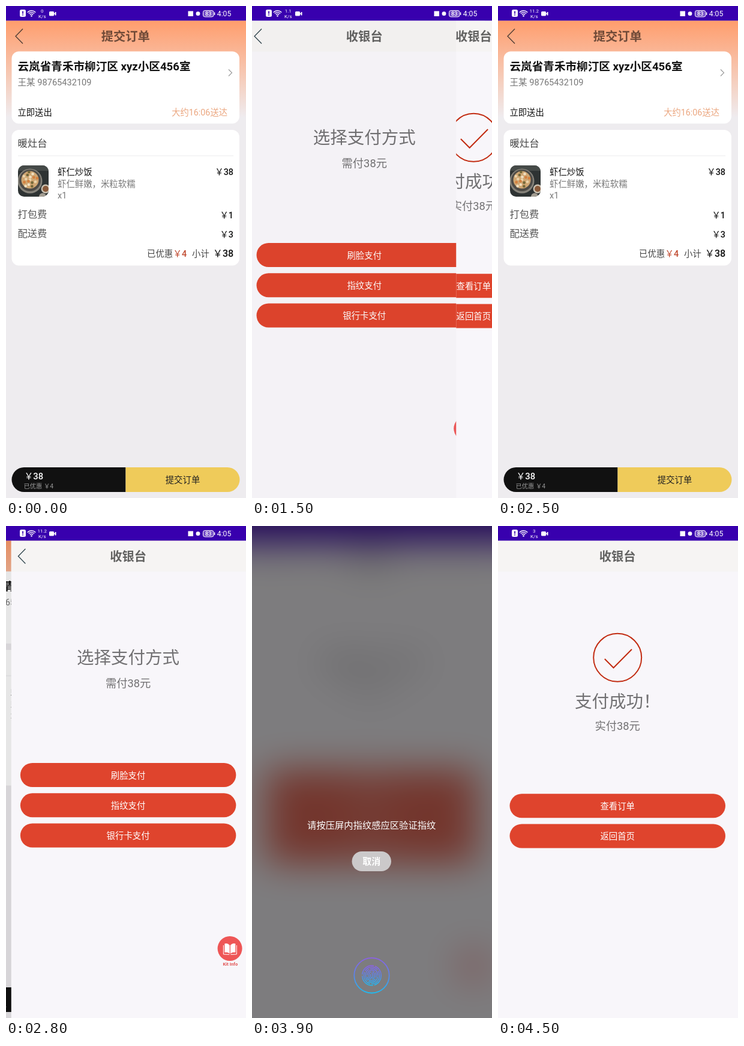
These frames come from a looping animation (400x818 px, 4.6 s). An HTML page with a canvas:

```html
<!DOCTYPE html>
<html lang="zh-CN">
<head>
<meta charset="utf-8">
<title>提交订单</title>
<style>
html, body { margin: 0; width: 100%; height: 100%; overflow: hidden; background: #f8f6fa; }
canvas { display: block; width: 400px; height: 818px; }
</style>
</head>
<body>
<canvas id="stage"></canvas>
<script>
const W = 400, H = 818, BAR = 24.3, LOOP = 4600;
const FONT = 'Roboto, "Noto Sans CJK SC", "Noto Sans CJK", sans-serif';
const RED = '#df442d', PURPLE = '#3800ae', PAGE = '#f8f6fa', GREY = 'rgba(0,0,0,.54)';
const YEN = '\uFFE5';

function makeCanvas(w, h, scale) {
  const cv = document.createElement('canvas');
  cv.width = w * scale;
  cv.height = h * scale;
  return cv;
}

const dpr = window.devicePixelRatio || 1;
const stage = document.getElementById('stage');
stage.width = W * dpr;
stage.height = H * dpr;
const screen2d = stage.getContext('2d');
screen2d.scale(dpr, dpr);
let c = screen2d;

// --- drawing helpers ---
function text(s, x, cy, size, color, align = 'left', weight = 400) {
  c.font = `${weight} ${size}px ${FONT}`;
  c.fillStyle = color;
  c.textAlign = align;
  c.textBaseline = 'alphabetic';
  c.fillText(s, x, cy + size * 0.36);
}

function rect(x, y, w, h, color) {
  c.fillStyle = color;
  c.fillRect(x, y, w, h);
}

function round(x, y, w, h, r, color) {
  c.beginPath();
  c.roundRect(x, y, w, h, r);
  c.fillStyle = color;
  c.fill();
}

function disc(x, y, r, color) {
  c.beginPath();
  c.arc(x, y, r, 0, Math.PI * 2);
  c.fillStyle = color;
  c.fill();
}

function ring(x, y, r, color, width) {
  c.beginPath();
  c.arc(x, y, r, 0, Math.PI * 2);
  c.strokeStyle = color;
  c.lineWidth = width;
  c.stroke();
}

function line(points, color, width) {
  c.beginPath();
  points.forEach(([x, y]) => c.lineTo(x, y));
  c.strokeStyle = color;
  c.lineWidth = width;
  c.stroke();
}

function button(label, y) {
  round(19.5, y, 359.5, 40, 20, RED);
  text(label, 199.2, y + 20.7, 14.4, '#fff', 'center', 500);
}

const back = color => line([[28, 38], [16, 50.2], [28, 62.5]], color, 1.3);

// --- pages ---
function dish() {
  c.save();
  c.beginPath();
  c.roundRect(20, 265, 51, 52, 10);
  c.clip();
  rect(20, 265, 51, 52, '#2e3333');
  rect(20, 265, 51, 9, '#454a48');
  disc(40, 291, 20.5, '#85827a');
  disc(40, 290, 18, '#4d4b47');
  disc(40, 289, 14.5, '#cfa672');
  for (let i = 0; i < 16; i++) {
    const a = i * 2.4, d = 3.4 * Math.sqrt(i);
    disc(40 + d * Math.cos(a), 289 + d * Math.sin(a), 2.3,
      ['#ead3aa', '#d4803f', '#f0dfc0', '#74683a'][i % 4]);
  }
  disc(66, 304, 7.5, '#c9c0b0');
  disc(66, 304, 5, '#8a5a3a');
  disc(61, 317, 6, '#a39d92');
  c.restore();
}

function orderPage() {
  rect(0, BAR, W, H, '#eeecef');
  const g = c.createLinearGradient(0, BAR, 0, 185);
  g.addColorStop(0, '#ff9d6c');
  g.addColorStop(1, '#efecef');
  rect(0, BAR, W, 160, g);
  back('#4a3a33');
  text('提交订单', 199.2, 51, 20.3, 'rgba(0,0,0,.56)', 'center', 700);

  round(9.5, 75.5, 379.5, 120, 12, '#fff');
  text('云岚省青禾市柳汀区 xyz小区456室', 19.5, 100, 18.6, '#111', 'left', 700);
  text('王某 98765432109', 19.5, 127, 14.6, '#777');
  line([[371, 105.5], [376.5, 111], [371, 116.5]], '#999', 1.1);
  text('立即送出', 19.5, 177, 14.3, '#111', 'left', 500);
  text('大约16:06送达', 369, 177, 14.3, '#eba67f', 'right');

  round(9.5, 206, 379.5, 225.5, 12, '#fff');
  text('暖灶台', 19.5, 228, 16.4, '#444');
  rect(20, 248.5, 359, 1, '#ececee');
  dish();
  text('虾仁炒饭', 86, 276, 14.4, '#111', 'left', 500);
  text('虾仁鲜嫩，米粒软糯', 86, 296, 14.4, '#777');
  text('x1', 86, 315, 14.4, '#777');
  text('打包费', 19.5, 346.5, 16.3, '#555');
  text('配送费', 19.5, 378.5, 16.3, '#555');
  [[38, 276], [1, 347.5], [3, 380]].forEach(([n, y]) =>
    text(YEN + n, 379, y, 14.4, '#111', 'right', 500));
  text('已优惠', 235, 411.5, 14.4, '#444');
  text(YEN + 4, 278.5, 411.5, 14.4, '#c0492f', 'left', 500);
  text('小计', 310, 411.5, 14.4, '#444');
  text(YEN + 38, 379.3, 411, 16.2, '#111', 'right', 500);

  round(9.5, 767, 190, 41, [20.5, 0, 0, 20.5], '#111');
  round(199.5, 767, 190, 41, [0, 20.5, 20.5, 0], '#efcb5a');
  text(YEN + 38, 30.5, 781.5, 14.8, '#fff', 'left', 500);
  text('已优惠 ' + YEN + 4, 29.5, 798, 10.3, '#999');
  text('提交订单', 294.5, 788, 14.4, '#222', 'center', 500);
}

function cashHeader() {
  rect(0, BAR, W, H, PAGE);
  rect(0, BAR, W, 51.5, '#f6f4f3');
  text('收银台', 199.2, 51, 20.3, 'rgba(0,0,0,.6)', 'center', 700);
}

function kitInfo() {
  disc(368.7, 702.5, 20.5, '#ee5656');
  c.fillStyle = '#fff';
  for (const side of [-1, 1]) {
    c.beginPath();
    c.moveTo(369 + side * 0.6, 697);
    c.quadraticCurveTo(369 + side * 4, 693, 369 + side * 9, 694.5);
    c.lineTo(369 + side * 9, 709);
    c.quadraticCurveTo(369 + side * 4, 708, 369 + side * 0.6, 711);
    c.fill();
    line([[369 + side * 11, 697], [369 + side * 11, 712], [369 + side, 712.5]], '#fff', 1);
  }
  text('Kit Info', 369.5, 728, 7.6, '#e25555', 'center', 700);
}

function cashierPage() {
  cashHeader();
  back('#2f444c');
  text('选择支付方式', 199.2, 219, 28.5, GREY, 'center');
  text('需付38元', 199.2, 261, 18.3, GREY, 'center');
  button('刷脸支付', 394);
  button('指纹支付', 444.3);
  button('银行卡支付', 494.5);
  kitInfo();
}

function successPage() {
  cashHeader();
  ring(199.2, 218.8, 40, '#c22c12', 2);
  line([[177.8, 221], [192.5, 235.8], [223, 205]], '#c22c12', 2);
  text('支付成功！', 199.2, 291.5, 28.5, GREY, 'center');
  text('实付38元', 199.2, 332.5, 18.3, GREY, 'center');
  button('查看订单', 445.3);
  button('返回首页', 495.5);
}

function statusBar(speed) {
  rect(0, 0, W, BAR, PURPLE);
  round(23, 6, 10, 12, 2.5, '#fff');
  rect(27.2, 8.5, 1.7, 4.5, PURPLE);
  rect(27.2, 14, 1.7, 1.7, PURPLE);
  for (const r of [3.6, 6.4, 9.2]) {
    c.beginPath();
    c.arc(42.5, 17, r, -Math.PI * 0.76, -Math.PI * 0.24);
    c.strokeStyle = '#fff';
    c.lineWidth = 1.4;
    c.stroke();
  }
  disc(42.5, 16.5, 1.3, '#fff');
  text(speed, 60.3, 8, 8, '#fff', 'center');
  text('K/s', 60.3, 17, 8, '#fff', 'center');
  round(72, 9, 8, 7.5, 1.5, '#fff');
  line([[82.5, 10], [82.5, 15.5]], '#fff', 2);
  rect(79, 12, 3, 1.5, '#fff');

  round(303.5, 8.5, 8.5, 8.5, 0, '#fff');
  disc(320, 12.7, 3.4, '#fff');
  c.beginPath();
  c.roundRect(328.5, 7.5, 17.5, 10.5, 3);
  c.fillStyle = 'rgba(255,255,255,.3)';
  c.fill();
  c.strokeStyle = '#fff';
  c.lineWidth = 1;
  c.stroke();
  rect(347, 10.5, 1.3, 4.5, '#fff');
  text('83', 337.2, 12.8, 9.3, '#fff', 'center', 500);
  text('4:05', 375.3, 13, 12.2, '#fff', 'right');
}

// --- fingerprint prompt ---
function buildBlur() {
  const pad = 120, src = makeCanvas(W + pad * 2, H + pad * 2, 1);
  const out = makeCanvas(W, H, 1), keep = c;
  c = src.getContext('2d');
  rect(0, 0, src.width, src.height, PAGE);
  c.translate(pad, pad);
  c.scale(1, 1.04);
  cashierPage();
  rect(-pad, BAR, pad, H, PAGE);
  rect(-pad, -pad, src.width, pad + BAR, PURPLE);
  c = out.getContext('2d');
  c.filter = 'blur(32px)';
  c.drawImage(src, -pad, -pad);
  c.filter = 'none';
  rect(0, 0, W, H, 'rgba(4,4,4,.5)');
  c = keep;
  return out;
}
const blurred = buildBlur();

function glow(y, r) {
  const g = c.createLinearGradient(0, y - r, 0, y + r);
  g.addColorStop(0, '#8d5fe6');
  g.addColorStop(0.5, '#5a86ea');
  g.addColorStop(1, '#1cbdf2');
  return g;
}

function fingerprint(x, y) {
  ring(x, y, 29.2, glow(y, 30), 1.8);
  c.lineCap = 'round';
  c.strokeStyle = glow(y, 17);
  c.lineWidth = 1.5;
  for (let i = 0; i < 6; i++) {
    c.beginPath();
    c.ellipse(x, y, 1.8 + i * 2.8, 4 + i * 2.5, 0, 0, Math.PI * 2);
    c.setLineDash([11 + i * 3, 3.2]);
    c.lineDashOffset = i * 7;
    c.stroke();
  }
  c.setLineDash([]);
  c.lineCap = 'butt';
}

function prompt(alpha) {
  c.save();
  c.globalAlpha = alpha;
  c.drawImage(blurred, 0, 0, W, H);
  text('请按压屏内指纹感应区验证指纹', 199.2, 497, 15.3, '#fff', 'center', 500);
  round(166.5, 541, 65.5, 33, 16.5, '#cbc9ca');
  text('取消', 199.2, 558, 15, '#fff', 'center', 700);
  fingerprint(199.5, 747.3);
  c.restore();
}

function touchRing(alpha) {
  c.save();
  c.globalAlpha = alpha;
  disc(209.7, 754.3, 11.3, '#fcfbfe');
  ring(209.7, 754.3, 11.3, '#b7c6da', 1.7);
  c.restore();
}

// --- timeline ---
const clamp = v => Math.max(0, Math.min(1, v));
const ramp = (t, from, to) => clamp((t - from) / (to - from));

function slide(under, over, t, start) {
  const rest = Math.pow(1 - ramp(t, start, start + 400), 3);
  if (rest > 0) {
    c.save();
    c.translate(-80 * (1 - rest), 0);
    under();
    c.restore();
    rect(0, BAR, W, H, `rgba(0,0,0,${0.1 * (1 - rest)})`);
  }
  if (rest < 1) {
    c.save();
    c.beginPath();
    c.rect(W * rest, BAR, W, H);
    c.clip();
    c.translate(W / 2 * rest, 0);
    over();
    c.restore();
  }
}

function netSpeed(t) {
  if (t < 1500) return '0';
  if (t < 2300) return '1.1';
  return t < 3600 ? '11.2' : '3';
}

function draw(t) {
  if (t < 1200) slide(orderPage, cashierPage, t, 250);
  else if (t < 2300) slide(cashierPage, successPage, t, 1480);
  else if (t < 3200) slide(orderPage, cashierPage, t, 2513);
  else slide(cashierPage, successPage, t, 4009);
  statusBar(netSpeed(t));

  const shown = ramp(t, 3400, 3600) * (1 - ramp(t, 3940, 4040));
  if (shown > 0) prompt(shown);
  const touch = ramp(t, 4000, 4060) * (1 - ramp(t, 4220, 4300));
  if (touch > 0) touchRing(touch);
}

const began = performance.now();
function tick() {
  draw((performance.now() - began) % LOOP);
  requestAnimationFrame(tick);
}
tick();
</script>
</body>
</html>
```
